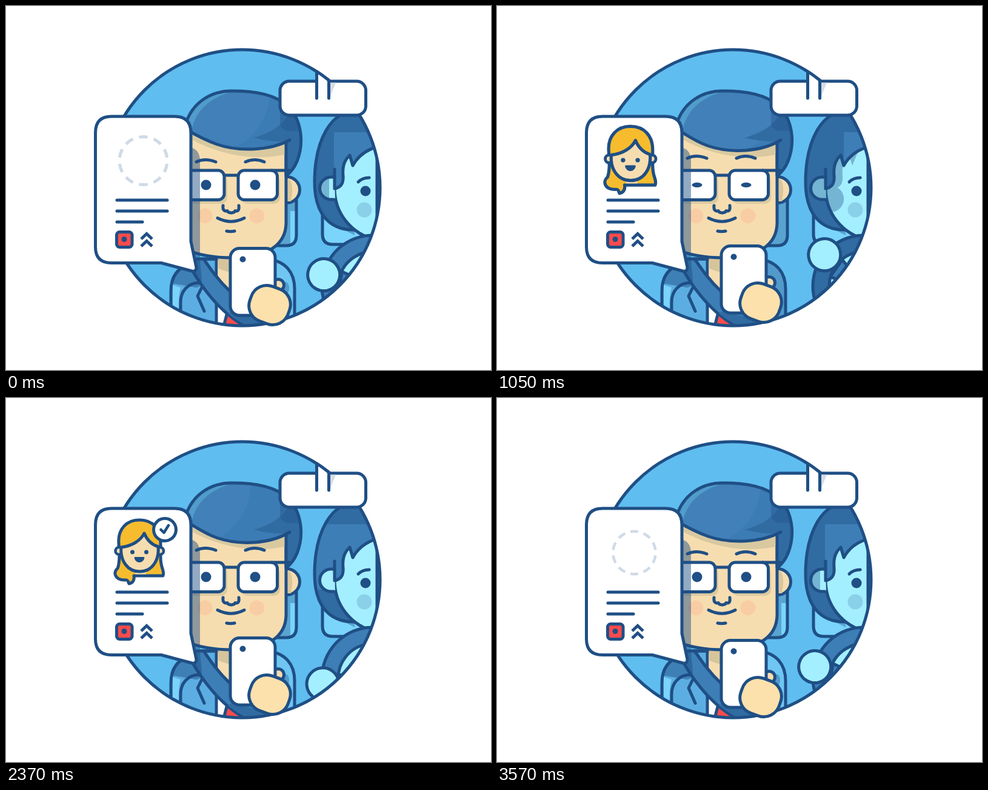
Animation of 800x600 px, one loop 3.6 s. Source, as an HTML page:

```html
<!DOCTYPE html>
<html lang="en">
<head>
<meta charset="utf-8">
<title>Ride match</title>
<style>
html, body { margin: 0; width: 100%; height: 100%; overflow: hidden; background: #fff; }
svg { display: block; width: 800px; height: 600px; }
.ln { fill: none; }
.ink { fill: #1f4f85; stroke: none; }
.flat { stroke: none; }
.shade { fill: #1f4f85; stroke: none; opacity: .36; }
.dark { fill: #306ba2; stroke: none; }
.hair { fill: #3d7eb6; }
.skin { fill: #f6ddb0; }
.cyan { fill: #a4efff; }
.aqua { fill: #7ad4fb; }
.coat { fill: #5caee2; }
.white { fill: #fff; }
.gold { fill: #f7bc2e; }
</style>
</head>
<body>
<svg viewBox="0 0 800 600" stroke="#1f4f85" stroke-width="5" stroke-linecap="round" stroke-linejoin="round">
<defs>
  <path id="manHair" d=""/>
  <path id="driverHair" d="M612 180 L585 174 C535 166 509 225 509 290 C509 343 534 369 573 369 L612 369Z"/>
  <path id="driverFace" d="M612 232 C592 238 579 250 572 263 L567 246 C556 256 555 268 556 280 C557 293 552 299 542 301 C542 340 568 376 612 386Z"/>
  <path id="driverEar" d="M542 282 H536 A18.5 18.5 0 0 0 536 319 H543Z"/>
  <path id="headrest" d="M463 312 H479 V378 Q479 395 462 395 H438 V312Z"/>
  <path id="rightArm" d="M430 417 C462 420 476 440 476 466 V528 H430Z"/>
  <path id="manFace" d="M296 200 V401 C320 412 348 415 374 415 C430 415 462 394 462 357 V215Z"/>
  <clipPath id="scene"><circle cx="389.5" cy="299.5" r="228"/></clipPath>
  <clipPath id="inManHair"><use href="#manHair"/></clipPath>
  <clipPath id="inManFace"><use href="#manFace"/></clipPath>
  <clipPath id="inDriverHair"><use href="#driverHair"/></clipPath>
  <clipPath id="inDriverFace"><use href="#driverFace"/></clipPath>
  <clipPath id="inDriverEar"><use href="#driverEar"/></clipPath>
  <clipPath id="inHeadrest"><use href="#headrest"/></clipPath>
  <clipPath id="inRightArm"><use href="#rightArm"/></clipPath>
</defs>

<g clip-path="url(#scene)">
  <rect class="flat" x="150" y="60" width="480" height="480" fill="#60bdef"/>

  <g id="driver">
    <path class="aqua" d="M522 330 V376 Q522 393 539 393 H590 V330Z"/>
    <path class="shade" d="M525 352 L575 378 V366 L525 330Z"/>
    <use href="#driverHair" class="hair flat"/>
    <g clip-path="url(#inDriverHair)">
      <rect class="dark" x="500" y="165" width="120" height="43"/>
      <rect class="dark" x="500" y="316" width="80" height="60"/>
      <rect class="dark" id="hairShade" x="500" y="165" height="215"/>
    </g>
    <use href="#driverHair" class="ln"/>
    <use href="#driverFace" class="cyan flat"/>
    <g clip-path="url(#inDriverFace)" opacity=".36">
      <circle class="ink" id="cheekShade" cy="318" r="22"/>
      <path class="ink" id="lockShade" d="M520 220 H590 L572 263 L567 246 C556 256 555 268 556 280 C557 293 552 299 542 301 H520Z"/>
    </g>
    <use href="#driverFace" class="ln"/>
    <use href="#driverEar" class="cyan flat"/>
    <g clip-path="url(#inDriverEar)"><rect class="shade" id="earShade" x="500" y="270" height="60"/></g>
    <path class="ln" d="M542 282 H536 A18.5 18.5 0 0 0 536 319 H541"/>
    <path class="ln" d="M542 269 V301"/>
    <circle class="ink" cx="593" cy="305" r="8.5"/>
    <circle class="flat" cx="591" cy="336" r="12.5" fill="#8ad0e8"/>
    <path class="ln" d="M581 290 Q588 283 599 283"/>
  </g>

  <g id="wheel">
    <circle class="cyan flat" cx="605" cy="462" r="57"/>
    <path class="hair" d="M605 462 L552 485 L550 450Z"/>
    <circle class="ln" cx="605" cy="462" r="70.5" stroke="#3d7eb6" stroke-width="27"/>
    <circle class="ln" id="rimShade" cx="605" cy="462" r="70.5" stroke="#306ba2" stroke-width="27"/>
    <circle class="ln" cx="605" cy="462" r="84"/>
    <circle class="ln" cx="605" cy="462" r="57"/>
    <circle class="cyan" cx="522" cy="462" r="26.5"/>
  </g>

  <g id="body">
    <use href="#headrest" class="aqua flat"/>
    <g clip-path="url(#inHeadrest)" opacity=".36">
      <path class="ink" d="M438 312 H480 V338 H469 V400 H438Z"/>
      <rect class="ink sweep" x="468" y="338" height="60"/>
    </g>
    <use href="#headrest" class="ln"/>
    <use href="#rightArm" class="flat" fill="#6fc6f3"/>
    <g clip-path="url(#inRightArm)" opacity=".36">
      <path class="ink" d="M430 455 H462 Q468 458 467 468 Q464 478 455 478 H430Z"/>
      <rect class="ink sweep" x="440" y="410" height="120"/>
    </g>
    <use href="#rightArm" class="ln"/>
    <path class="coat" d="M272 535 V470 C272 444 286 430 305 424 L318 417 H350 V535Z"/>
    <path class="aqua flat" d="M275 495 V460 L288 464 Q284 476 285 500Z"/>
    <path class="ln" d="M288 510 V488 C288 470 300 456 320 456"/>
    <path class="ln" d="M325 460 L316 478 L327 503"/>
    <path class="white" d="M347 418 V535 H420 V418Z"/>
    <path class="skin flat" d="M349.5 405 H400 V470 H349.5Z"/>
    <path class="flat" d="M349.5 405 H400 V440 Q370 443 349.5 432Z" fill="#d6c49b"/>
    <path fill="#fb4b4b" d="M365 505 L358 532 H400 L390 512Z"/>
    <path class="hair" d="M303 417 H326 C350 452 375 488 450 520 V532 H402 C362 512 332 478 308 437Z"/>
    <path class="dark" d="M374 502 Q400 512 448 520 V530 H402 Q380 518 366 507Z"/>
    <path class="ln" d="M326 417 H347"/>
  </g>

  <g id="head">
    <circle class="skin" cx="463" cy="303" r="21.5"/>
    <path class="flat" d="M465 284 Q476 290 470 322 H464Z" fill="#d9c69b"/>
    <use href="#manHair" class="hair flat"/>
    <use href="#manFace" class="skin"/>
    <g clip-path="url(#inManFace)">
      <path class="flat" d="M295 213 C340 243 410 258 463 244 V200 H295Z" fill="#d9c9a0"/>
    </g>
    <use href="#manHair" class="flat" fill="#3c7cb4"/>
    <g clip-path="url(#inManHair)">
      <circle class="flat" id="hairGlow" cy="142" r="100" fill="#4180b8"/>
      <path class="flat" d="M290 205 C300 155 340 136 378 140 C338 149 310 172 305 212Z" fill="#509ccb"/>
      <path class="dark" d="M472 165 C464 192 440 209 408 217 Q440 225 463 223 V290 H495 V165Z"/>
      <rect class="shade" x="452" y="140" width="50" height="66" rx="14"/>
    </g>
    <use href="#manHair" class="ln"/>
    <g class="flat" fill="#d9c9a0">
      <rect x="300" y="279" width="65" height="47" rx="10"/>
      <rect x="388" y="279" width="64" height="47" rx="10"/>
    </g>
    <g class="flat" fill="#f9cda4"><circle cx="328" cy="346" r="12.5"/><circle cx="414" cy="346" r="12.5"/></g>
    <rect class="white" x="280" y="271" width="80" height="48.5" rx="10"/>
    <rect class="white" x="383" y="271" width="64.5" height="48.5" rx="10"/>
    <path class="ln" d="M360 279 H383 M438 271 H467"/>
    <ellipse class="ink eye" cx="330" cy="295" rx="8.5"/>
    <ellipse class="ink eye" cx="411" cy="295" rx="8.5"/>
    <path class="ln" id="brows" d="M314 257 Q328 250 346 257 M395 257 Q410 250 426 257"/>
    <path class="ln" d="M358 329 C357 337 361 339 365 337.500 C367 342 376 342 378 337.500 C382 339 385 337 384 329"/>
    <path class="ln" d="M349 349.500 Q371 361 393 349.500 M364 371 Q370 372.500 377 371"/>
  </g>
  <path class="flat" d="M300 233 C314 233 320 243 320 255 V420 L323 450 C323 465 315 465 308 463 L271 457 Q275 434 300 424Z" fill="#1f4f85" opacity=".48"/>
</g>

<circle class="ln" cx="389.5" cy="299.5" r="227.5"/>

<g id="mirror">
  <rect class="white" x="452" y="124" width="141.500" height="56" rx="15"/>
  <path class="white flat" d="M512 107 L533 122 V152 H512Z"/>
  <path class="flat" d="M534 126.500 H544 L534 151Z" fill="#d5dce6"/>
  <path class="ln" d="M512.500 152 V108 A227.500 227.500 0 0 1 532.500 122.500 V152"/>
</g>

<g id="phone">
  <circle class="skin" cx="449" cy="460" r="9.500"/>
  <rect class="white" x="370" y="399.500" width="74" height="110.500" rx="15"/>
  <circle class="ink" cx="390.500" cy="417.500" r="5"/>
  <rect x="401.500" y="462.500" width="67" height="61" rx="27" transform="rotate(20 435 493)" fill="#fde1ac"/>
</g>

<g id="card">
  <path class="white" d="M174 182 H278 Q305 182 305 209 V388 L314 431 Q314 438 307 437 L256 423.500 H174 Q147.500 423.500 147.500 397 V209 Q147.500 182 174 182Z"/>
  <path class="ln" d="M183 320 H266 M183 338 H266 M183 356 H225"/>
  <rect x="182.500" y="372.500" width="25.500" height="25" rx="5" fill="#fb4b4b"/>
  <circle class="ink" cx="195" cy="384.500" r="4.500"/>
  <path class="ln" stroke-linecap="butt" stroke-linejoin="miter" d="M223 384 L232 375.500 L241 384 M223 396 L232 387.500 L241 396"/>
  <g id="blank">
    <circle class="ln" cx="226.500" cy="255" r="39.500" stroke="#cfdae6" stroke-linecap="butt" pathLength="100" stroke-dasharray="5.800 4.200" stroke-dashoffset="2.900" transform="rotate(-90 226.500 255)"/>
  </g>
  <g id="avatar">
    <path class="gold" d="M186 240 C184 215 200 201 220 201 C241 201 256 215 255 240 V262 C255 283 262 283 259 293 H211 C212 299 210 305 203 306 C201 303 202 299 196 300 C178 300 177 286 184 281 C187 274 187 265 187 258Z"/>
    <path class="skin flat" d="M213 278 H231 V290.500 H213Z"/>
    <circle class="skin" cx="186.500" cy="252" r="6" stroke-width="4.500"/>
    <circle class="skin" cx="254" cy="252" r="6" stroke-width="4.500"/>
    <path class="skin" d="M190 246 C208 244 222 235 228 223 C233 235 241 242 251 245 C253 269 240 286 220.500 286 C201 286 188 269 190 246Z"/>
    <circle class="ink" cx="208.500" cy="254" r="3.500"/>
    <circle class="ink" cx="231.500" cy="254" r="3.500"/>
    <path class="ink" d="M213 262 H227 Q229 262 228 265 C225 273 215 273 212 265 Q211 262 213 262Z"/>
  </g>
  <g id="badge">
    <circle class="white" cx="262" cy="217" r="18.500"/>
    <path class="ln" d="M255.500 217 L260.500 222 L268 210" stroke-width="4.500"/>
  </g>
</g>
</svg>

<script>
const LOOP = 3600;
const $ = id => document.getElementById(id);
const all = sel => document.querySelectorAll(sel);

// Tables of [time, value], eased between neighbours.
const steps = {
  turn: [[0, 13.2], [30, 13.2], [600, 38.7], [1140, 38.7], [2220, -9], [2910, 13.2]],
  lift: [[0, 0], [570, 0], [810, 1], [3210, 1], [3480, 0]],
  lid: [[0, 8.5], [960, 8.5], [1050, 4], [1140, 8.5]],
  blank: [[0, 1], [720, 1], [870, 0], [3420, 0], [3570, .89], [3600, 1]],
  avatar: [[0, 0], [840, 0], [1050, 1.05], [1200, 1], [3300, 1], [3420, 0]],
  badge: [[0, 0], [1200, 0], [1350, 1.1], [1440, 1], [3060, 1], [3240, 0]]
};

function at(name, t) {
  const list = steps[name];
  const i = list.findIndex(k => k[0] > t);
  if (i < 0) return list[list.length - 1][1];
  const [t0, a] = list[i - 1], [t1, b] = list[i];
  return a + (b - a) * (1 - Math.cos(Math.PI * (t - t0) / (t1 - t0))) / 2;
}

const set = (el, name, value) => el.setAttribute(name, value);
const shift = (id, x, y) => set($(id), 'transform', `translate(${x} ${y})`);
const pop = (id, x, y, s) =>
  set($(id), 'transform', `translate(${x} ${y}) scale(${s}) translate(${-x} ${-y})`);
const clamp = v => Math.max(0, Math.min(1, v));

function draw(t) {
  const turn = at('turn', t), lift = at('lift', t), off = turn - 13.2;
  const edge = 541 + off * (off < 0 ? 2 : 1.22);
  const dim = clamp(off / 20);

  set($('wheel'), 'transform', `rotate(${turn} 605 462)`);
  set($('rimShade'), 'opacity', dim);
  set($('hairShade'), 'width', Math.max(0, edge - 500));
  set($('earShade'), 'width', Math.max(0, edge - 508));
  set($('cheekShade'), 'cx', edge - 22);
  shift('lockShade', (edge - 541) * .45, 0);
  set($('hairGlow'), 'cx', 335 + off * 1.6);
  all('.sweep').forEach(el => set(el, 'width', 42 * dim));

  const y = 2.5 * lift;
  set($('manHair'), 'd', `M296 195 C308 157 340 140 372 140 C412 140 444 146 465 165
    C488 188 492 226 480 256 C475 268 470 274 462 280 V224 L468 221
    C436 ${238 + y} 386 ${241 + y} 348 ${228 + y} C326 ${220 + y} 312 212 300 205Z`);
  shift('brows', 0, -6 * lift);
  shift('phone', 0, -4 * lift);
  all('.eye').forEach(el => set(el, 'ry', at('lid', t)));

  pop('blank', 226.5, 255, at('blank', t));
  pop('avatar', 220, 252, at('avatar', t));
  pop('badge', 262, 217, at('badge', t));
}

function tick() {
  draw(performance.now() % LOOP);
  requestAnimationFrame(tick);
}
tick();
</script>
</body>
</html>
```
